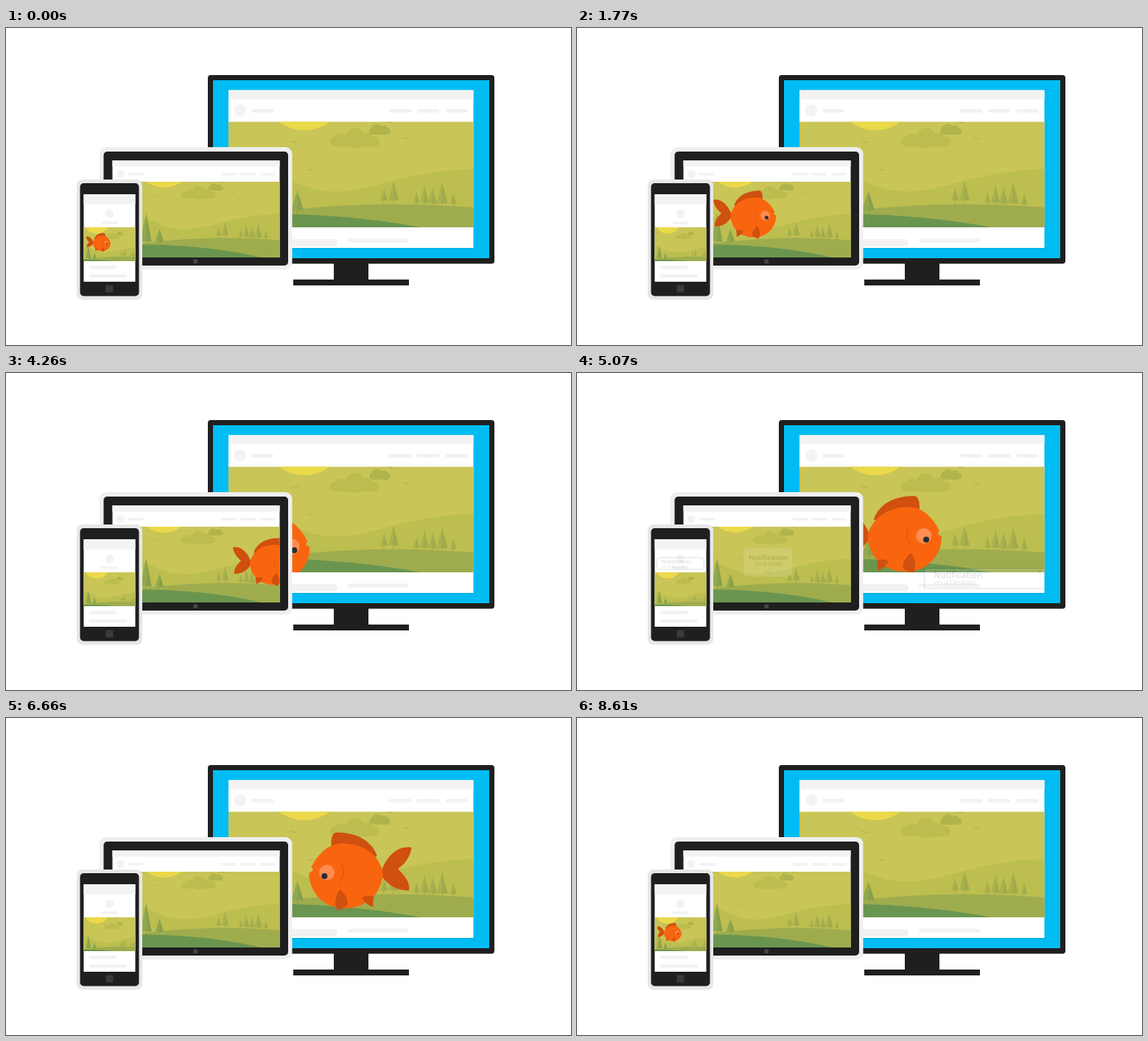
Write an HTML page that moves like this. It is 767 by 431 pixels and loops after 8.64 s.

```html
<!DOCTYPE html>
<html lang="en">
<head>
<meta charset="utf-8">
<title>Responsive fish</title>
<style>
  html, body { margin: 0; width: 100%; height: 100%; overflow: hidden; background: #fff; }
  body > svg { display: block; width: 767px; height: 431px; }
  text { font-family: "Open Sans", "Noto Sans", sans-serif; fill: #111; }
  .b { font-weight: 600; }
  .pills { fill: none; stroke: #f2f2f2; stroke-linecap: round; }
  .dark { fill: #1f1f1f; }
  .soft { fill: #f3f3f3; }
  .fin { fill: #cf500f; }
</style>
</head>
<body>
<svg viewBox="0 0 767 431">
  <defs>
    <g id="scene">
      <rect x="-20" y="-20" width="370" height="190" fill="#c9c557"/>
      <circle cx="103" cy="-44.7" r="56.3" fill="#ecd94a"/>
      <g fill="#bcbc4f">
        <rect x="138" y="20" width="67" height="13.5" rx="6.7"/>
        <circle cx="153" cy="24" r="8"/><circle cx="172" cy="22" r="13.5"/><circle cx="188" cy="24" r="9"/>
      </g>
      <g fill="#b1b44b">
        <rect x="191" y="8" width="29" height="9.5" rx="4.7"/>
        <circle cx="201" cy="10" r="7"/><circle cx="211" cy="11" r="6"/>
        <path d="M214 0h9l-2 2z"/>
      </g>
      <path d="M84 27q3-1 6 1.500q3-2 5-1M107 65q3-1 5 1q2-2 4-1M236 22q2-1 4 1q2-2 4 0" fill="none" stroke="#b1b14b"/>
      <path d="M-20 52C60 56 90 95 145 95C200 95 240 64 350 64V170H-20Z" fill="#bdbe50"/>
      <g id="backTrees"></g>
      <path d="M-20 133C90 118 190 104 350 118V170H-20Z" fill="#9eac4e"/>
      <g id="frontTrees"></g>
      <path d="M-20 126C90 122 200 128 300 152V170H-20Z" fill="#6a954f"/>
    </g>
    <g id="fish">
      <g class="fin">
        <path id="ghost" d="M-29-2C-33-15-42-26-54-24C-53-15-47-9-43-6C-49 0-53 6-52 12C-42 12-34 7-29-2Z"/>
        <use href="#ghost" id="tail"/>
        <path d="M-26-17C-21-31-7-37 9-36.500C12-35 13-30 12-23L-20-14Z"/>
      </g>
      <path d="M-31-2C-29-18-13-27.500 3-27.500C15-27.500 24-18 29-7.500L27.500-5L31-2.500C31 13 19 27 1 27C-17 27-30 15-31-2Z" fill="#f9650e"/>
      <g class="fin">
        <path d="M-23.500 17.500Q-18 15.500-13.500 18Q-16 24-23 26Q-22 22-23.500 17.500Z"/>
        <path d="M5 11C0 16-3 21-.5 25L6.500 29C10 25 10 18 5 11Z"/>
      </g>
      <path d="M4-11Q-1-2 6 5" fill="none" stroke="#e2570d" stroke-width=".8"/>
      <circle cx="16" cy="-3" r="6.500" fill="#ff8c50"/>
      <circle cx="18" cy="0" r="2.500" fill="#2b2b33"/>
    </g>
  </defs>

  <!-- Desktop -->
  <path class="dark" d="M445 318h47v24h55v8H390v-8h55z"/>
  <rect class="dark" x="274" y="64" width="389" height="256.500" rx="4"/>
  <path d="M281 71h375v242H281z" fill="#00bcf2"/>
  <path d="M302 84.500h332.500V301H302z" fill="#00a5d8" opacity=".4"/>
  <path d="M302 84.500h332.500V299H302z" fill="#fff"/>
  <path class="soft" d="M302 84.500h332.500V97H302z"/>
  <circle class="soft" cx="318" cy="112" r="8"/>
  <path class="pills" stroke-width="5" d="M335.500 112.500h25M522 112.500h26M560 112.500h26M599 112.500h25M466.500 289h78"/>
  <path class="pills" stroke-width="10" d="M330 292h115"/>
  <svg x="302" y="127.500" width="332.500" height="143.500" viewBox="302 127.500 332.500 143.500">
    <use href="#scene" transform="translate(302 127.500)"/>
    <use href="#fish" id="bigFish"/>
  </svg>
  <g class="note">
    <path d="M635 265.500H471.500V293H635" fill="#fff" stroke="#111"/>
    <text class="b" x="484" y="279" font-size="11.700">Notification</text>
    <text x="485" y="288" font-size="9.100">on a Desktop</text>
    <text x="625.500" y="274" font-size="8.500">X</text>
  </g>

  <!-- Tablet -->
  <rect x="127" y="162" width="261.500" height="166.500" rx="9" fill="#efefef"/>
  <rect class="dark" x="132.500" y="168" width="250.500" height="155" rx="5"/>
  <path d="M144.500 180h227v132h-227z" fill="#fff"/>
  <path class="soft" d="M144.500 180h227v8.500h-227z"/>
  <circle class="soft" cx="155" cy="198.500" r="5.500"/>
  <path class="pills" stroke-width="3.600" d="M167 198.700h18M294 198.700h18M320 198.700h18M347 198.700h17"/>
  <rect x="254.500" y="314.500" width="5.500" height="5.500" fill="#444"/>
  <svg x="144.500" y="209" width="227" height="103" viewBox="144.500 209 227 103">
    <use href="#scene" transform="translate(144.500 209) scale(.682)"/>
    <use href="#fish" id="midFish"/>
  </svg>
  <g class="note" text-anchor="middle">
    <rect x="226.500" y="238.500" width="65.500" height="38.500" rx="5" fill="#fff"/>
    <text class="b" x="260" y="254" font-size="9.400">Notification</text>
    <text x="260" y="262" font-size="7.700">on a tablet</text>
    <text class="b" x="259" y="274" font-size="6.300" style="fill:#1a9fd8">OK</text>
  </g>

  <!-- Phone -->
  <rect x="96" y="206" width="89" height="163.500" rx="8" fill="#e7e7e7"/>
  <rect class="dark" x="100.500" y="211" width="80" height="153.500" rx="5"/>
  <path d="M105.500 226h70v119h-70z" fill="#fff"/>
  <path class="soft" d="M105.500 226h70v14h-70z"/>
  <circle class="soft" cx="140.500" cy="252.500" r="5.700"/>
  <path class="pills" stroke-width="3.600" d="M131 264.700h19"/>
  <path class="pills" stroke-width="4.600" d="M115 325.500h33M115 337.300h47"/>
  <rect x="135.500" y="349.500" width="10" height="10" fill="#3a3a3a"/>
  <svg x="105.500" y="271" width="70" height="46" viewBox="105.500 271 70 46">
    <use href="#scene" transform="translate(91 276) scale(.31)"/>
    <use href="#fish" id="smallFish"/>
  </svg>
  <g class="note">
    <rect x="108" y="251" width="64.500" height="16" rx="4" fill="#fff" stroke="#111" stroke-width="1.200"/>
    <text class="b" x="114" y="259.200" font-size="7.400">Notification</text>
    <text x="115" y="264.500" font-size="5.900">on a phone</text>
  </g>
</svg>
<script>
const LOOP = 8640;
const $ = id => document.getElementById(id);
const notes = document.querySelectorAll('.note');

// Two-tone firs: centre, top, base, half width
function firs(id, list, left, right) {
  $(id).innerHTML = list.map(([x, top, base, w]) =>
    `<path d="M${x} ${top}L${x - w} ${base}H${x}Z" fill="${left}"/>` +
    `<path d="M${x} ${top}L${x + w} ${base}H${x}Z" fill="${right}"/>` +
    `<path d="M${x} ${base - 6}v${12}" stroke="${right}"/>`).join('');
}
firs('backTrees', [[211, 91, 107, 5], [224, 80, 107, 7], [255, 95, 110, 4], [266, 86, 110, 6],
  [277, 89, 111, 6], [290, 82, 111, 7.5], [305, 97, 112, 4.5]], '#a9b24e', '#9fab4c');
firs('frontTrees', [[67, 62, 119, 11], [93.5, 94, 120, 8.5]], '#92a84e', '#87a04c');

// Smooth curve through [time, value] points
function curve(keys, t) {
  const at = i => keys[Math.max(0, Math.min(keys.length - 1, i))];
  if (t <= keys[0][0]) return keys[0][1];
  if (t >= at(Infinity)[0]) return at(Infinity)[1];
  const i = keys.findIndex(k => k[0] > t) - 1;
  const [a, b, c, d] = [at(i - 1), at(i), at(i + 1), at(i + 2)];
  const span = c[0] - b[0], u = (t - b[0]) / span;
  const m = (c[1] - a[1]) / (c[0] - a[0]) * span;
  const n = (d[1] - b[1]) / (d[0] - b[0]) * span;
  return b[1] + u * (m + u * (3 * (c[1] - b[1]) - 2 * m - n + u * (2 * (b[1] - c[1]) + m + n)));
}
function ramp(t, from, to) {
  const u = Math.max(0, Math.min(1, (t - from) / (to - from)));
  return u * u * (3 - 2 * u);
}

const pathX = [[0, 130], [450, 140], [900, 177], [1740, 238], [2670, 258.5], [3100, 263], [3500, 259],
  [3900, 296], [4260, 362], [4800, 425], [5400, 461], [6000, 471], [6400, 470], [6700, 458],
  [6990, 409], [7230, 292], [7500, 190], [7750, 140], [7950, 130], [8640, 130]];
const swimmers = [
  ['smallFish', 0.39, [[0, 293], [930, 289.5], [7400, 289.5], [7900, 293]]],
  ['midFish', 1, [[600, 272], [930, 268.5], [1700, 258], [2670, 260], [4260, 261], [7230, 254.5], [7600, 264]]],
  ['bigFish', 1.62, [[4000, 244], [4260, 241], [5220, 224], [6000, 213], [6400, 212], [6990, 221], [7300, 232]]]
];

function draw(t) {
  const x = curve(pathX, t);
  const face = 1 - 2 * ramp(t, 6250, 6550) + 2 * ramp(t, 8000, 8250);
  const dash = ramp(t, 6850, 7200) - ramp(t, 7350, 7800);
  for (const [id, size, pathY] of swimmers) {
    $(id).setAttribute('transform',
      `translate(${x} ${curve(pathY, t)}) scale(${size * face} ${size}) rotate(${13 * dash})`);
  }
  const stretch = 1 + 0.04 * Math.sin(t / LOOP * 24 * Math.PI) + 0.15 * dash;
  $('tail').setAttribute('transform',
    `translate(-29 -2) rotate(${-10 * dash}) scale(${stretch} 1) translate(29 2)`);
  $('ghost').style.opacity = 1 - 0.45 * dash;
  const shown = ramp(t, 4980, 5400) - ramp(t, 6150, 6500);
  notes.forEach(n => n.setAttribute('opacity', shown));
}

const start = performance.now();
function tick() {
  draw((performance.now() - start) % LOOP);
  requestAnimationFrame(tick);
}
tick();
</script>
</body>
</html>
```
